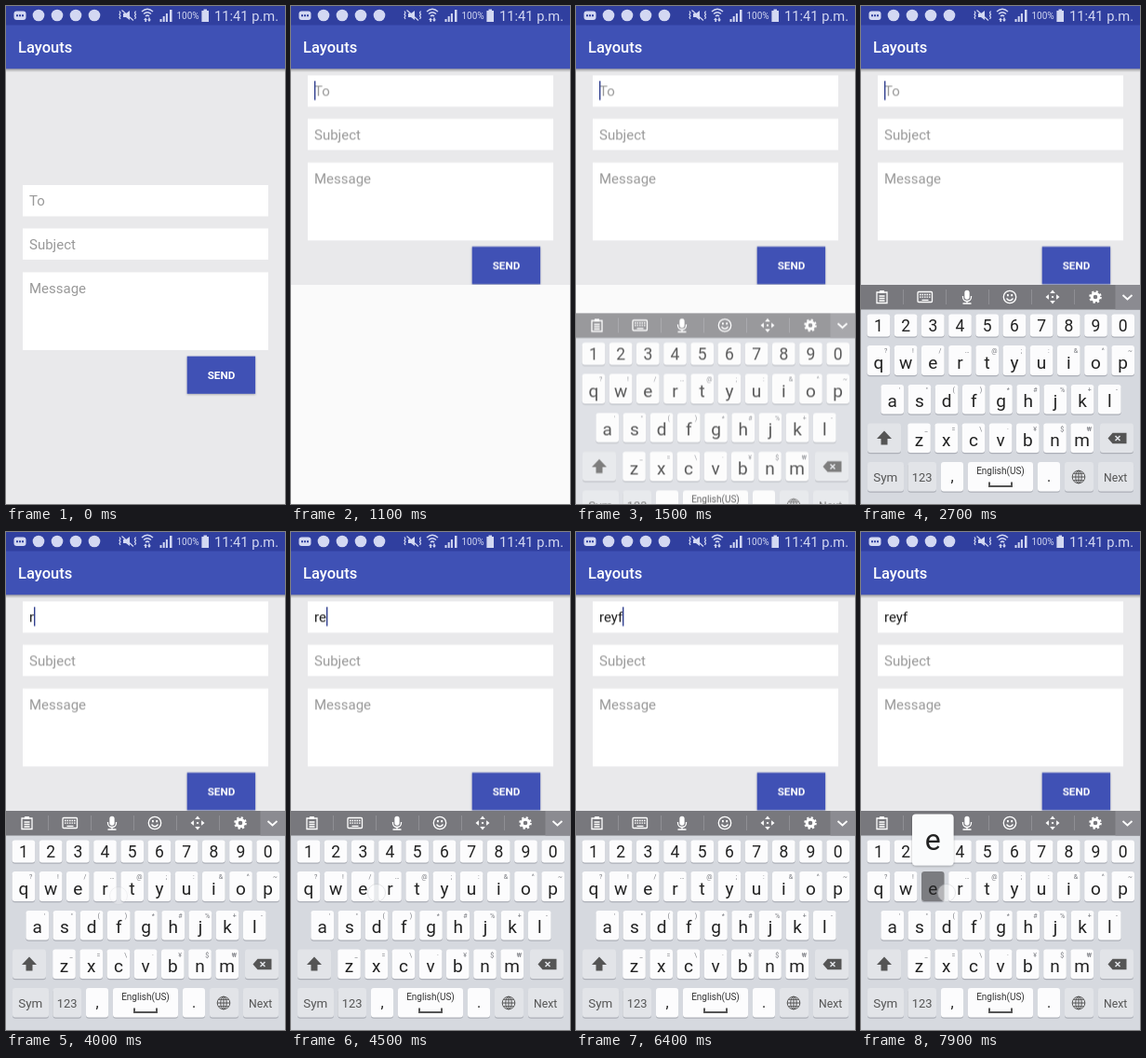
Animation of 300x534 px, one loop 8 s. Source, as an HTML page:

```html
<!DOCTYPE html>
<html lang="en">
<head>
<meta charset="utf-8">
<title>Layouts</title>
<style>
html, body { margin: 0; width: 100%; height: 100%; overflow: hidden; background: #e9e9eb; }
svg { display: block; width: 100%; height: 100%; }
text { font-family: Roboto, "Noto Sans", sans-serif; }
.mid { text-anchor: middle; }
.hint { font-size: 15px; fill: #999; }
.typed { font-size: 15px; fill: #1c1c1c; }
.line { fill: none; stroke: #fff; stroke-width: 1.3; }
.letter { font-size: 19px; fill: #222; }
.digit { font-size: 17.5px; fill: #222; }
.mark { font-size: 16px; fill: #222; }
.alt { font-size: 7px; fill: #77797f; }
.fn { fill: #555; }

/* 1.25% of the loop is 100 ms */
#form, #blank, #keyboard, #cursor, #to, .typed tspan { animation: 8s step-end infinite; }
#form { animation-name: pan; }
#blank { animation-name: blank; }
#keyboard { animation-name: rise, fade; }
#cursor { animation-name: cursor; }
#to { animation-name: hint; }
.typed tspan { animation-name: type1; }
.typed tspan:nth-child(2) { animation-name: type2; }
.typed tspan:nth-child(3) { animation-name: type3; }
.typed tspan:nth-child(4) { animation-name: type4; }

@keyframes pan { 0% { transform: none; } 12.5%, 100% { transform: translateY(-117.6px); } }
@keyframes blank { 0% { opacity: 0; } 12.5%, 100% { opacity: 1; } }
@keyframes rise {
  0% { transform: translateY(152px); }
  13.75% { transform: translateY(152px); animation-timing-function: steps(5); }
  20%, 100% { transform: none; }
}
@keyframes fade {
  0% { opacity: 0; }
  15% { opacity: 0; animation-timing-function: steps(4); }
  20%, 100% { opacity: 1; }
}
@keyframes hint { 0% { visibility: visible; } 47.5%, 100% { visibility: hidden; } }
@keyframes type1 { 0% { visibility: hidden; } 47.5%, 100% { visibility: visible; } }
@keyframes type2 { 0% { visibility: hidden; } 56.25%, 100% { visibility: visible; } }
@keyframes type3 { 0% { visibility: hidden; } 62.5%, 100% { visibility: visible; } }
@keyframes type4 { 0% { visibility: hidden; } 66.25%, 100% { visibility: visible; } }
@keyframes cursor {
  0%, 11.25%, 25%, 37.5% { opacity: 0; transform: none; }
  5%, 12.5%, 31.25%, 43.75% { opacity: 1; transform: none; }
  47.5% { opacity: 1; transform: translateX(5px); }
  53.75% { opacity: 0; transform: translateX(5px); }
  56.25% { opacity: 1; transform: translateX(13px); }
  62.5% { opacity: 1; transform: translateX(20px); }
  66.25%, 78.75% { opacity: 1; transform: translateX(25px); }
  72.5%, 85% { opacity: 0; transform: translateX(25px); }
  86.25% { opacity: 1; transform: translateY(47px); }
  92.5%, 100% { opacity: 0; transform: translateY(47px); }
}
</style>
</head>
<body>
<svg viewBox="0 0 300 534" preserveAspectRatio="none">
  <defs>
    <linearGradient id="shade" x2="0" y2="1">
      <stop stop-color="#000" stop-opacity=".34"/>
      <stop offset="1" stop-color="#000" stop-opacity="0"/>
    </linearGradient>
    <filter id="drop" x="-20%" y="-20%" width="140%" height="150%">
      <feDropShadow dx="0" dy=".8" stdDeviation=".8" flood-opacity=".3"/>
    </filter>
  </defs>
  <rect width="300" height="534" fill="#e9e9eb"/>

  <g id="form">
    <path fill="#fff" d="M18 192h264v33.500h-264zM18 238.500h264v33.500h-264zM18 285.500h264v83.500h-264z"/>
    <text id="to" class="hint" x="25" y="214.200">To</text>
    <text class="hint" x="25" y="261.200">Subject</text>
    <text class="hint" x="25" y="308">Message</text>
    <text class="typed" x="25" y="214.200"><tspan>r</tspan><tspan>e</tspan><tspan>y</tspan><tspan>f</tspan></text>
    <rect id="cursor" x="25" y="198" width="1.400" height="20.500" fill="#303f8f"/>
    <rect x="194.700" y="375.600" width="73.400" height="40.200" fill="#3f51b5" filter="url(#drop)"/>
    <text class="mid" x="231.500" y="400.300" font-size="11.700" font-weight="700" fill="#fff">SEND</text>
  </g>
  <rect id="blank" y="299" width="300" height="235" fill="#fafafa"/>

  <rect y="67" width="300" height="4" fill="url(#shade)"/>
  <rect width="300" height="67.300" fill="#3f51b5"/>
  <rect width="300" height="20.500" fill="#303f9f"/>
  <text x="13" y="50" font-size="16.500" font-weight="500" fill="#fff">Layouts</text>

  <g fill="#d3d8f2">
    <rect x="8.500" y="5.500" width="13" height="9.500" rx="3"/>
    <path d="M11 9.300h2v2h-2zM14 9.300h2v2h-2zM17 9.300h2v2h-2z" fill="#303f9f"/>
    <circle cx="35" cy="10" r="6.300"/><circle cx="55" cy="10" r="6.300"/>
    <circle cx="75" cy="10" r="6.300"/><circle cx="95" cy="10" r="6.300"/>
    <path d="M126 8h3l4-3v10l-4-3h-3z"/>
    <g fill="none" stroke="#d3d8f2" stroke-width="1.200">
      <path d="M122 5.500l1 1.700-1 1.700 1 1.700-1 1.700 1 1.700M139.500 5.500l-1 1.700 1 1.700-1 1.700 1 1.700-1 1.700M124.500 4.500l12.500 11"/>
      <path d="M146 6q6-5.500 12 0M148 8.500q4-3.500 8 0M150 11q2-1.800 4 0" stroke-width="1.500"/>
    </g>
    <path d="M150 12.500l2 2.500h-1v2h-1.600v-2h-1.400zM154 17l-2-2.500h1.200v-2h1.600v2h1.200z"/>
    <path d="M165.500 14h2v3h-2zM168.700 11h2v6h-2zM171.900 8h2v9h-2zM176 4h2.500v13h-2.500z"/>
    <path d="M212.500 3.500h3.500v1.500h2v12h-7.600v-12h2.100z"/>
    <text x="183.500" y="14.200" font-size="10">100%</text>
    <text x="224" y="16" font-size="14.700">11:41 p.m.</text>
  </g>

  <g id="keyboard">
    <rect y="299" width="300" height="235" fill="#d6d9df"/>
    <rect y="299" width="300" height="26.500" fill="#78787d"/>
    <rect x="273.500" y="299" width="26.500" height="26.500" fill="#8b8b91"/>
    <path d="M45.500 304v16m46-16v16m46-16v16m46-16v16m46-16v16" stroke="#8f8f94"/>
    <g class="line">
      <path d="M17 307h11v11.500h-11zM19.500 311h6M19.500 313.500h6M19.500 316h6"/>
      <path d="M20 306.500h5" stroke-width="3"/>
      <rect x="61" y="306.500" width="15.500" height="11" rx="1"/>
      <path d="M63 309.500h12M63 312.200h12" stroke-dasharray="1.600 .9"/>
      <path d="M65.500 315.300h7M109.500 311v1a4.500 4.500 0 0 0 9 0v-1M114 316.500v2.500M109.500 319h9"/>
      <rect x="112" y="305.500" width="4" height="8.500" rx="2" fill="#fff"/>
      <circle cx="160" cy="312" r="6.700"/>
      <path d="M156.500 313.500q3.500 4.500 7 0"/>
      <circle cx="252" cy="312" r="3.800" stroke-width="3"/>
      <circle cx="252" cy="312" r="5.800" stroke-width="2" stroke-dasharray="2.270 2.285"/>
      <path d="M281.500 310l5 4.500 5-4.500" stroke-width="1.800"/>
    </g>
    <path fill="#fff" d="M157 309h1.800v2.300h-1.800zM161.300 309h1.800v2.300h-1.800zM206 304.500l2.800 3.400h-5.600zM206 319.500l2.800-3.400h-5.600zM198.500 312l3.400-2.800v5.600zM213.500 312l-3.400-2.800v5.600zM205 311h2v2h-2z"/>
    <g id="keys"></g>
    <g class="fn">
      <path d="M25 455.500l8 8.500h-4.500v6.500h-7v-6.500h-4.500z"/>
      <path d="M265.500 463.500l5-5.800h15v11.600h-15z"/>
      <path d="M273.500 461l5 5m0-5l-5 5" stroke="#e2e4e8" stroke-width="1.500"/>
      <g fill="none" stroke="#555">
        <circle cx="234" cy="505" r="6.800"/><ellipse cx="234" cy="505" rx="3.200" ry="6.800"/>
        <path d="M227.200 505h13.600M234 498.200v13.600M228.500 501.300h11M228.500 508.700h11"/>
        <path d="M138 510.500v4.500h24v-4.500" stroke-width="2"/>
      </g>
      <g class="mid">
        <text x="26.300" y="510" font-size="13.400">Sym</text>
        <text x="65.700" y="510" font-size="12.900">123</text>
        <text x="273.700" y="509.500" font-size="12.200">Next</text>
        <text x="150" y="502" font-size="10" fill="#333">English(US)</text>
      </g>
    </g>
    <g id="presses"></g>
  </g>
</svg>
<script>
const PITCH = 29.2;
const sheet = document.createElement('style');
const spots = {};
let keys = '', presses = '', rules = '';

const rect = (x, y, w, h, fill, extra = 'rx="3"') =>
  `<rect x="${x}" y="${y}" width="${w}" height="${h}" fill="${fill}" ${extra}/>`;
const label = (x, y, str, cls) => `<text class="mid ${cls}" x="${x}" y="${y}">${str}</text>`;
const cap = (x, y, w, h, fill = '#fcfcfd') =>
  rect(x, y + 1.2, w, h, '#adb0b8') + rect(x, y, w, h, fill);

function row(chars, alts, cx, y, h, base, cls) {
  [...chars].forEach((ch, i) => {
    const x = cx + i * PITCH;
    spots[ch] = { x, y, base };
    keys += cap(x - 12.3, y, 24.6, h) + label(x, base, ch, cls);
    if (alts) keys += label(x + 7.7, y + 8, alts[i].replace('&', '&amp;'), 'alt');
  });
}
row('1234567890', '', 18.9, 330.5, 24, 349.2, 'digit');
row('qwertyuiop', '?!/…@;:&^~', 18.9, 364, 32, 388.5, 'letter');
row('asdfghjkl', '\'"()*#%+-', 33.7, 406, 31.5, 430.3, 'letter');
row('zxcvbnm', '_=\\·¥$₩', 62.5, 447.5, 31.5, 472.3, 'letter');

const grey = '#e2e4e8';
[[7, 447.5, 36, grey], [257, 447.5, 36, grey], [7, 489, 39, grey], [50.5, 489, 30.5, grey],
 [86, 489, 24], [115, 489, 70], [190, 489, 24], [219, 489, 31, grey], [255, 489, 38, grey]]
  .forEach(([x, y, w, fill]) => keys += cap(x, y, w, 31.5, fill));
keys += label(98, 510, ',', 'mark') + label(202, 510, '.', 'mark');

// key, down, up, touch faded out (ms), touch point
const taps = [
  ['r', 3500, 3800, 4200, 121, 390],
  ['e', 4300, 4500, 4700, 92, 387],
  ['y', 4800, 5000, 5200, 151, 400],
  ['f', 5200, 5300, 5500, 138, 437],
  ['Next', 6800, 6900, 7200, 278, 508],
  ['e', 7700, 8000, 8000, 92, 387]
];
const pct = ms => ms / 80 + '%';

taps.forEach(([ch, down, up, gone, tx, ty], i) => {
  const end = up < 8000;
  rules += `@keyframes press${i}{0%{opacity:0}${pct(down)}{opacity:1}` +
    (end ? `${pct(up)},100%{opacity:0}` : '100%{opacity:1}') + '}' +
    `@keyframes touch${i}{0%{opacity:0}${pct(down)}{opacity:.45}` +
    (end ? `${pct(up)}{opacity:.45;animation-timing-function:linear}${pct(gone)},100%{opacity:0}`
         : '100%{opacity:.45}') + '}';
  const anim = name => `style="animation:${name}${i} 8s step-end infinite"`;
  const spot = spots[ch];
  const shape = spot
    ? rect(spot.x - 12.3, spot.y, 24.6, 32, '#7b7c80') + label(spot.x, spot.base, ch, 'letter') +
      rect(spot.x - 22.3, spot.y - 61.5, 44.6, 55, '#fafbfc', 'rx="4" filter="url(#drop)"') +
      `<text class="mid" x="${spot.x}" y="${spot.y - 23}" font-size="32" fill="#222">${ch}</text>`
    : rect(255, 489, 38, 32, '#7b7c80') +
      '<text class="mid" x="273.7" y="509.5" font-size="12.2" fill="#333">Next</text>';
  presses += `<g ${anim('press')}>${shape}</g>` +
    `<circle cx="${tx}" cy="${ty}" r="9.5" fill="#fff" stroke="#b9bbc0" stroke-width=".8" ${anim('touch')}/>`;
});

sheet.textContent = rules;
document.head.append(sheet);
document.getElementById('keys').innerHTML = keys;
document.getElementById('presses').innerHTML = presses;
</script>
</body>
</html>
```
